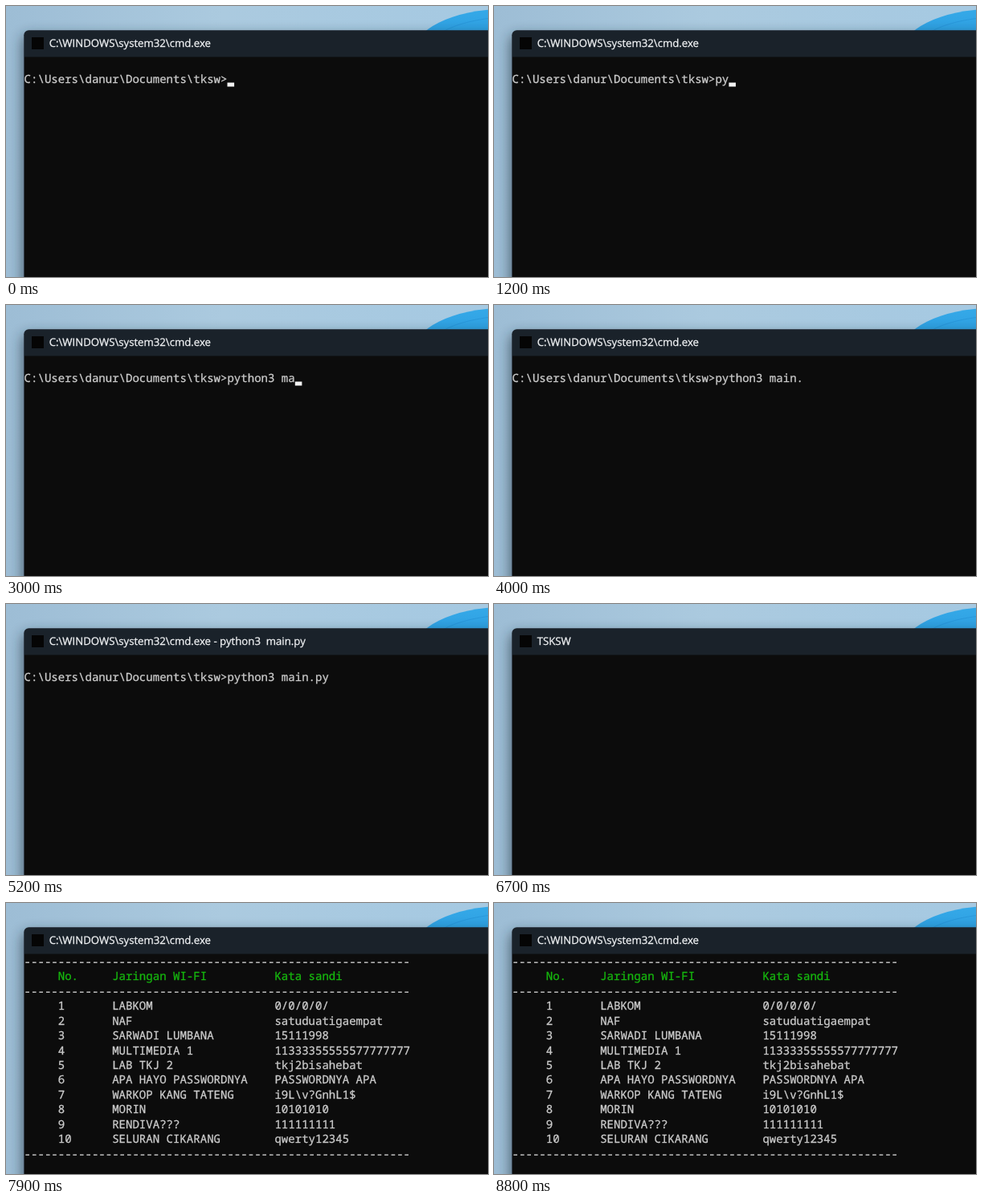
Recreate the animation shown at these times as an HTML page. Size 600x338 px, loop 8.9 s.

```html
<!DOCTYPE html>
<html lang="id">
<head>
<meta charset="utf-8">
<title>Terminal</title>
<style>
  html, body { margin: 0; width: 100%; height: 100%; overflow: hidden; background: #9dbdd4; }
  svg { display: block; width: 600px; height: 338px; }
  text { white-space: pre; text-rendering: geometricPrecision; stroke-width: .3px; }
  #title { font: 13.2px "Open Sans", "Noto Sans", sans-serif; fill: #f0f2f4; stroke: #f0f2f4; }
  #screen { font: 14.05px "Noto Sans Mono", "DejaVu Sans Mono", monospace; fill: #cccccc; stroke: #cccccc; }
  #screen .head { fill: #16b80e; stroke: #16b80e; }
</style>
</head>
<body>
<svg viewBox="0 0 600 338" xmlns="http://www.w3.org/2000/svg">
  <defs>
    <linearGradient id="sky" x1="0" y1="0" x2="1" y2="0">
      <stop offset="0" stop-color="#9dbdd5"/>
      <stop offset=".45" stop-color="#abcadf"/>
      <stop offset="1" stop-color="#a5c9e2"/>
    </linearGradient>
    <linearGradient id="petal" x1="0" y1="0" x2="0" y2="1">
      <stop offset="0" stop-color="#35a9e8"/>
      <stop offset="1" stop-color="#1b86cf"/>
    </linearGradient>
    <filter id="soft" x="-10%" y="-20%" width="120%" height="140%">
      <feGaussianBlur stdDeviation="8"/>
    </filter>
  </defs>
  <rect width="600" height="338" fill="url(#sky)"/>
  <ellipse cx="620" cy="60" rx="114" ry="56" fill="url(#petal)"/>
  <ellipse cx="628" cy="62" rx="108" ry="48" fill="none" stroke="#1a7fc6" stroke-opacity=".35"/>
  <rect x="20" y="36" width="660" height="400" rx="8" fill="#1c2a36" opacity=".6" filter="url(#soft)"/>
  <rect x="22.3" y="30.2" width="640" height="400" rx="6" fill="#1a222a"/>
  <rect x="23" y="63.5" width="577" height="275" fill="#0c0c0c"/>
  <rect x="32" y="39" width="15" height="15" fill="#050505"/>
  <text id="title" x="53.7" y="51"></text>
  <g id="screen"></g>
  <rect id="cursor" width="8.6" height="5" fill="#f2f2f2"/>
</svg>
<script>
const LOOP = 8900, CELL = 8.43, LINE = 18.44, LEFT = 22.6;
const PROMPT = "C:\\Users\\danur\\Documents\\tksw>";
const COMMAND = "python3 main.py";
const SHELL = "C:\\WINDOWS\\system32\\cmd.exe";
const RULE = "-".repeat(57);
const NETWORKS = [
  ["LABKOM", "0/0/0/0/"],
  ["NAF", "satuduatigaempat"],
  ["SARWADI LUMBANA", "15111998"],
  ["MULTIMEDIA 1", "11333355555577777777"],
  ["LAB TKJ 2", "tkj2bisahebat"],
  ["APA HAYO PASSWORDNYA", "PASSWORDNYA APA"],
  ["WARKOP KANG TATENG", "i9L\\v?GnhL1$"],
  ["MORIN", "10101010"],
  ["RENDIVA???", "111111111"],
  ["SELURAN CIKARANG", "qwerty12345"]
];

// Typing: [time, characters typed, cursor visible]
const TYPING = [
  [0, 0, 1], [800, 1, 0], [1200, 2, 1], [1400, 3, 1], [1600, 4, 1], [1800, 5, 1],
  [2100, 6, 1], [2300, 7, 1], [2500, 8, 1], [2800, 9, 1], [3000, 10, 1],
  [3300, 11, 1], [3800, 12, 0], [4000, 13, 0], [4100, 14, 1], [4400, 15, 1], [4600, 15, 0]
];
// Empty screen: [time, cursor visible]
const WAITING = [[5400, 1], [5600, 0], [6100, 1], [6700, 0]];

const columns = (no, name, pass) => " ".repeat(5) + no.padEnd(8) + name.padEnd(24) + pass;

function tableLines() {
  const rows = NETWORKS.map(([name, pass], i) => columns(String(i + 1), name, pass));
  return [RULE, columns("No.", "Jaringan WI-FI", "Kata sandi"), RULE, ...rows, RULE];
}

const STEPS = [
  ...TYPING.map(([at, n, on]) => ({
    at, title: SHELL, lines: ["", PROMPT + COMMAND.slice(0, n)],
    cursor: on ? [PROMPT.length + n, 1] : null
  })),
  { at: 5100, title: SHELL + " - python3  main.py", lines: ["", PROMPT + COMMAND], cursor: null },
  ...WAITING.map(([at, on]) => ({ at, title: "TSKSW", lines: [], cursor: on ? [0, 0] : null })),
  { at: 7000, title: SHELL, lines: tableLines(), cursor: null, head: 1 }
];

const title = document.getElementById("title");
const screen = document.getElementById("screen");
const cursor = document.getElementById("cursor");
let shown = null;

function addLine(text, row, isHead) {
  const el = document.createElementNS("http://www.w3.org/2000/svg", "text");
  el.setAttribute("x", LEFT);
  el.setAttribute("y", 77.9 + row * LINE);
  if (isHead) el.setAttribute("class", "head");
  el.textContent = text;
  screen.append(el);
}

function show(step) {
  title.textContent = step.title;
  screen.replaceChildren();
  step.lines.forEach((text, row) => text && addLine(text, row, row === step.head));
  cursor.style.display = step.cursor ? "" : "none";
  if (step.cursor) {
    cursor.setAttribute("x", LEFT + step.cursor[0] * CELL);
    cursor.setAttribute("y", 77.1 + step.cursor[1] * LINE);
  }
}

function tick() {
  const t = performance.now() % LOOP;
  const step = STEPS.findLast(s => s.at <= t);
  if (step !== shown) show(shown = step);
  requestAnimationFrame(tick);
}
tick();
</script>
</body>
</html>
```
